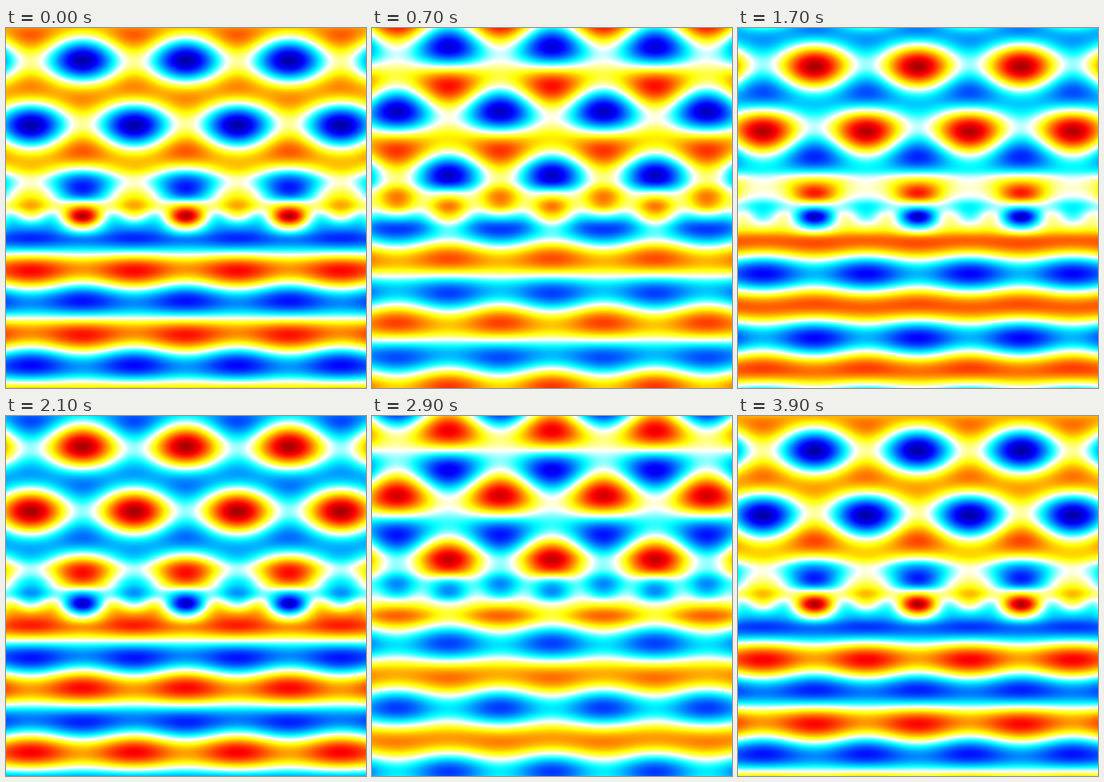
Recreate the animation shown at these times as a matplotlib script. Size 360 px wide and 360 px high, loop 4 s.

```python
import numpy as np
import matplotlib.pyplot as plt
from matplotlib.animation import FuncAnimation
from matplotlib.colors import LinearSegmentedColormap

SIZE, FRAMES, INTERVAL = 360, 40, 100
PITCH = 103.3            # lateral period in pixels
K0 = 2 * np.pi / 64      # vertical wavenumber, order 0
K1 = 0.046               # vertical wavenumber, first orders

# Jet-like colours with white at zero, positions scaled to 0..1
WAVE_MAP = LinearSegmentedColormap.from_list("wave", [
    (0, (0, 0, 0.5)), (0.125, (0, 0, 1)), (0.375, (0, 1, 1)),
    (0.5, (1, 1, 1)),
    (0.625, (1, 1, 0)), (0.875, (1, 0, 0)), (1, (0.5, 0, 0))], N=1024)


def transmitted(y):
    """Upward waves above the grating, one row per lateral harmonic."""
    return np.array([0.41 * np.exp(1j * (K0 * y - 0.09)),
                     0.51 * np.exp(1j * (K1 * y + 1.72)),
                     0j * y])


def incident(y):
    """Incident and reflected waves below the grating."""
    d = K0 * (y - 242)
    return np.array([0.53 * np.exp(1j * d) + 0.07 * np.exp(-1j * d),
                     -0.18 * np.exp(-1j * K1 * (y - 256)),
                     0j * y])


# Near field around the pillars: height, then the three harmonics
NEAR = np.array([
    [152, -0.27 + 0.25j, -0.33 + 0.36j, 0],
    [168, -0.125 - 0.32j, -0.375, -0.13j],
    [178, 0.26 - 0.195j, -0.035 - 0.085j, 0.13 - 0.12j],
    [188, 0.22 + 0.155j, 0.40 - 0.025j, 0.29 + 0.02j],
    [200, -0.25 + 0.36j, 0.27 - 0.14j, 0.10],
])


def hermite(y, knots, values):
    """Smooth cubic interpolation through the knots."""
    slope = np.gradient(values, knots)
    i = np.clip(np.searchsorted(knots, y) - 1, 0, len(knots) - 2)
    h = knots[i + 1] - knots[i]
    t = (y - knots[i]) / h
    return ((1 + 2 * t) * (1 - t) ** 2 * values[i]
            + t * (1 - t) ** 2 * h * slope[i]
            + t ** 2 * (3 - 2 * t) * values[i + 1]
            + t ** 2 * (t - 1) * h * slope[i + 1])


def build_field():
    above = np.arange(-4.0, 141, 4)
    below = np.arange(212.0, 369, 4)
    knots = np.concatenate([above, NEAR[:, 0].real, below])
    values = np.hstack([transmitted(above), NEAR[:, 1:].T, incident(below)])
    pixels = np.arange(SIZE) + 0.5
    angle = 2 * np.pi * (pixels - SIZE / 2) / PITCH
    return sum(np.outer(hermite(pixels, knots, row), np.cos(m * angle))
               for m, row in enumerate(values))


field = build_field()


def wave(frame):
    return (field * np.exp(2j * np.pi * frame / FRAMES)).real


fig = plt.figure(figsize=(3.6, 3.6), dpi=100)
ax = fig.add_axes([0, 0, 1, 1])
ax.axis("off")
image = ax.imshow(wave(0), cmap=WAVE_MAP, vmin=-1, vmax=1,
                  interpolation="nearest", aspect="auto")


def update(frame):
    image.set_data(wave(frame))
    return [image]


anim = FuncAnimation(fig, update, frames=FRAMES, interval=INTERVAL,
                     repeat=True, repeat_delay=0)
plt.show()
```
